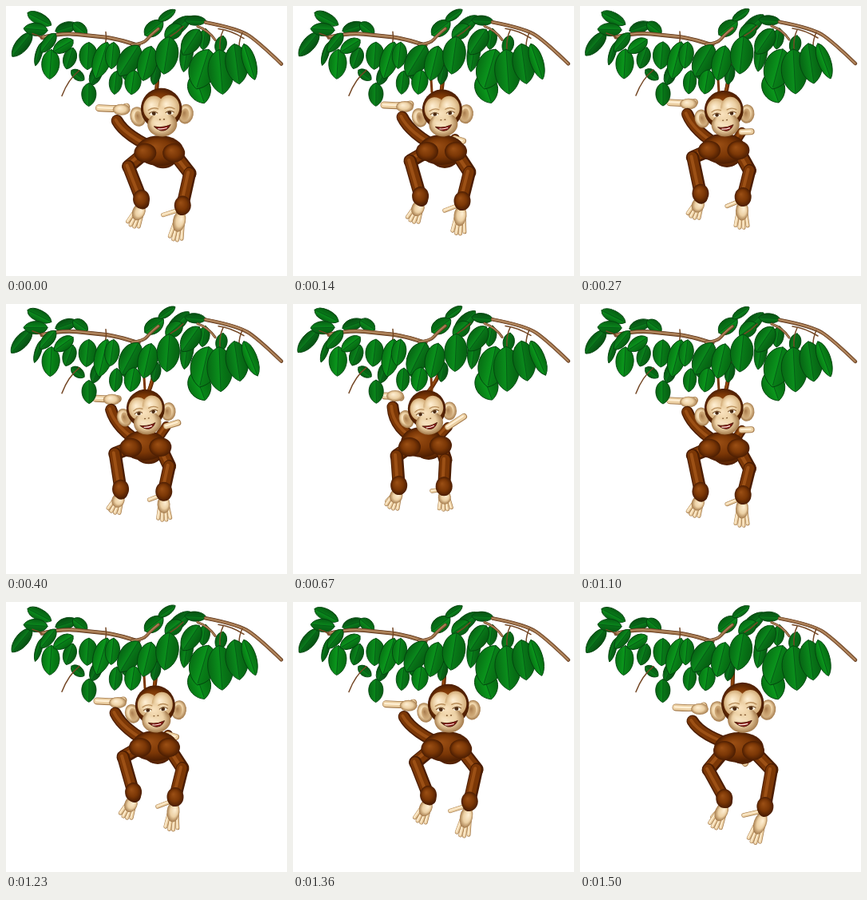
An HTML page with a canvas for the animation above (1670 ms loop, 352x338 px).

```html
<!DOCTYPE html>
<html lang="en">
<head>
<meta charset="utf-8">
<title>Swinging monkey</title>
<style>
html, body { margin: 0; width: 100%; height: 100%; overflow: hidden; background: #fff; }
canvas { display: block; width: 352px; height: 338px; }
</style>
</head>
<body>
<canvas id="stage" width="352" height="338"></canvas>
<script>
const g = document.getElementById('stage').getContext('2d');
g.lineCap = g.lineJoin = 'round';

const LOOP = 1670;
const STARTS = [0, 140, 270, 400, 530, 670, 830, 970, 1100, 1230, 1360, 1500];
const FUR = ['#4b1d02', '#7b3706', '#9c5015'];
const SKIN = ['#a47a4b', '#ecd0a4', '#fff0d5'];
const WOOD = ['#56321a', '#94663f', '#bd946c'];

// Leaves: base x, y, tip x, y, half width
const BACK = [
  [32, 33, 7, 62, 8], [27, 8, 57, 23, 7], [52, 30, 22, 29, 8], [45, 45, 36, 74, 4],
  [62, 31, 89, 22, 7], [84, 21, 102, 34, 7], [84, 52, 75, 78, 8], [82, 80, 98, 92, 6],
  [118, 73, 108, 99, 7], [174, 36, 197, 19, 9], [191, 18, 212, 4, 5], [203, 36, 230, 11, 8],
  [224, 17, 251, 19, 6], [230, 36, 223, 82, 8], [272, 37, 267, 60, 7], [152, 74, 153, 94, 8],
  [190, 74, 185, 98, 6], [220, 24, 200, 40, 9], [250, 28, 246, 54, 7]
];
const FRONT = [
  [62, 34, 43, 57, 7], [57, 54, 55, 91, 11], [84, 42, 60, 58, 8], [104, 45, 101, 79, 11],
  [104, 96, 104, 125, 9], [127, 45, 115, 91, 11], [135, 45, 131, 78, 9], [139, 81, 136, 110, 8],
  [166, 49, 144, 88, 13], [161, 80, 156, 110, 10], [182, 50, 172, 93, 12], [205, 38, 200, 85, 14],
  [242, 29, 221, 60, 11], [236, 84, 249, 121, 14], [254, 54, 241, 104, 17], [267, 54, 270, 110, 16],
  [286, 47, 293, 97, 14], [298, 47, 314, 91, 8]
];

// Joint positions at the right end, at a third of the way, and at the left end
const JOINTS = {
  tailTop: [192, 74, 189, 74, 188, 76], tailEnd: [191, 108, 185, 112, 168, 112],
  chest: [199, 182, 186, 180, 161, 173], hip: [204, 188, 190, 188, 170, 180],
  foot: [150, 134, 140, 126, 128, 115], toe: [120, 132, 114, 124, 115, 115],
  heel: [155, 130, 147, 123, 135, 117],
  ankle: [141, 149, 137, 139, 125, 129], knee: [152, 168, 147, 160, 127, 158],
  ankle2: [200, 193, 203, 166, 194, 154], foot2: [207, 202, 213, 169, 214, 141],
  shoulderL: [181, 186, 168, 182, 146, 179], elbowL: [161, 210, 147, 194, 130, 190],
  wristL: [183, 250, 161, 243, 133, 231], tipL: [168, 283, 149, 270, 123, 256],
  thumbL: [166, 269, 147, 265, 118, 247],
  shoulderR: [217, 186, 204, 182, 185, 177], elbowR: [240, 210, 221, 208, 191, 195],
  wristR: [231, 261, 211, 248, 189, 232], tipR: [217, 302, 207, 286, 191, 258],
  thumbR: [205, 267, 190, 256, 174, 234],
  head: [204, 136, 187.5, 137.5, 169, 139]
};

// Parabola through the values at d = 0, 2 and 6
const bend = (a, b, c, d) =>
  a * (d - 2) * (d - 6) / 12 - b * d * (d - 6) / 8 + c * d * (d - 2) / 24;

function pose(d) {
  const p = {};
  for (const name in JOINTS) {
    const [x0, y0, x1, y1, x2, y2] = JOINTS[name];
    p[name] = [bend(x0, x1, x2, d), bend(y0, y1, y2, d)];
  }
  return p;
}

const mix = (a, b, t) => [a[0] + (b[0] - a[0]) * t, a[1] + (b[1] - a[1]) * t];

function line(pts, width, color) {
  g.beginPath();
  g.moveTo(...pts[0]);
  for (let i = 1; i < pts.length - 1; i++) {
    const end = i === pts.length - 2 ? pts[i + 1] : mix(pts[i], pts[i + 1], .5);
    g.quadraticCurveTo(...pts[i], ...end);
  }
  if (pts.length === 2) g.lineTo(...pts[1]);
  g.lineWidth = width;
  g.strokeStyle = color;
  g.stroke();
}

// Rounded tube, lit from the upper left
function tube(pts, width, [dark, mid, light]) {
  line(pts, width, dark);
  const up = k => pts.map(([x, y]) => [x - width * k, y - width * k * .6]);
  line(up(.04), width * .78, mid);
  line(up(.12), width * .25, light);
}

function ball(x, y, rx, ry, [dark, mid, light], turn = 0) {
  g.save();
  g.translate(x, y);
  g.rotate(turn);
  g.scale(rx, ry);
  const fill = g.createRadialGradient(-.25, -.3, 0, 0, 0, 1);
  fill.addColorStop(0, light);
  fill.addColorStop(.6, mid);
  fill.addColorStop(1, dark);
  g.fillStyle = fill;
  g.beginPath();
  g.arc(0, 0, 1, 0, 7);
  g.fill();
  g.restore();
}

function dot(x, y, rx, ry, color) {
  g.beginPath();
  g.ellipse(x, y, rx, ry, 0, 0, 7);
  g.fillStyle = color;
  g.fill();
}

function leaf([x, y, tx, ty, w], i, sway, front) {
  const len = Math.hypot(tx - x, ty - y);
  const tone = (front ? 0 : -14) + i * 7 % 4 * 5;
  const green = v => `rgb(${v * .07}, ${v + tone}, ${v * .2})`;
  g.save();
  g.translate(x, y + sway * .7);
  g.rotate(Math.atan2(ty - y, tx - x) + sway * .045 * (i % 3 - .7));
  const fill = g.createLinearGradient(0, w, 0, -w);
  fill.addColorStop(0, green(100));
  fill.addColorStop(.47, green(138));
  fill.addColorStop(.53, green(118));
  fill.addColorStop(1, green(92));
  g.beginPath();
  g.moveTo(0, 0);
  g.bezierCurveTo(len * .12, w * 1.35, len * .8, w * 1.35, len, 0);
  g.bezierCurveTo(len * .8, -w * 1.35, len * .12, -w * 1.35, 0, 0);
  g.fillStyle = fill;
  g.fill();
  g.lineWidth = .9;
  g.strokeStyle = '#04450f';
  g.stroke();
  line([[0, 0], [len * .95, 0]], .9, '#075b17');
  g.restore();
}

function tree(sway) {
  BACK.forEach((l, i) => leaf(l, i, sway, false));
  g.save();
  g.translate(0, sway * .6);
  tube([[45, 39], [70, 33], [108, 37], [138, 40], [166, 49]], 5, WOOD);
  tube([[158, 48], [172, 47], [181, 36], [191, 28]], 4, WOOD);
  tube([[250, 20], [292, 28], [318, 46], [345, 72]], 4.5, WOOD);
  tube([[240, 25], [254, 30], [262, 42]], 3, WOOD);
  const twigs = [
    [[92, 80], [78, 91], [70, 112]], [[125, 32], [127, 45], [121, 54]],
    [[266, 28], [282, 30], [298, 40]], [[272, 30], [267, 40], [268, 54]],
    [[278, 55], [286, 62], [290, 72]], [[205, 38], [214, 33], [222, 25]],
    [[45, 39], [39, 36], [33, 34]], [[296, 33], [292, 42], [292, 50]]
  ];
  twigs.forEach(t => line(t, 1.5, '#744725'));
  g.restore();
  FRONT.forEach((l, i) => leaf(l, i, sway, true));
}

function hand(wrist, tip, thumb) {
  const dx = tip[0] - wrist[0], dy = tip[1] - wrist[1];
  const len = Math.hypot(dx, dy), nx = -dy / len, ny = dx / len;
  const palm = mix(wrist, tip, .38);
  tube([wrist, mix(wrist, thumb, .65), thumb], 5.5, SKIN);
  for (const k of [-1.5, -.5, .5, 1.5]) {
    const reach = 1 - Math.abs(k) * .07;
    tube([
      [palm[0] + nx * k * 3, palm[1] + ny * k * 3],
      [wrist[0] + dx * reach + nx * k * 5, wrist[1] + dy * reach + ny * k * 5]
    ], 5, SKIN);
  }
  ball(...palm, len * .34, 8, SKIN, Math.atan2(dy, dx));
}

function arm(p, side) {
  const [shoulder, elbow, wrist] = ['shoulder', 'elbow', 'wrist'].map(n => p[n + side]);
  hand(wrist, p['tip' + side], p['thumb' + side]);
  tube([shoulder, elbow], 17, FUR);
  tube([elbow, mix(elbow, wrist, .5), wrist], 16, FUR);
  ball(...mix(elbow, wrist, .9), 10.5, 12, FUR);
}

function head([x, y], d) {
  const size = bend(1.07, 1, .95, d);
  g.save();
  g.translate(x, y);
  g.rotate(bend(-.03, -.08, -.19, d));
  g.scale(size, size);
  for (const s of [-1, 1]) {
    ball(s * 29, 0, 9.5, 12, SKIN, s * .2);
    ball(s * 28, 1, 5, 8, ['#d2ae7d', '#c79f6d', '#a87b4d'], s * .2);
  }
  ball(0, -8, 25, 25, FUR);
  for (const s of [-1, 1]) ball(s * 9, -9, 13, 15, ['#d1ab78', ...SKIN.slice(1)]);
  ball(0, 11, 18, 15, SKIN);
  ball(0, 0, 13, 12, ['#eed3a800', '#eed3a8', '#fae3bf']);
  for (const s of [-1, 1]) {
    line([[s * 4, -8], [s * 10, -11], [s * 16, -7]], 1.3, '#b88d59');
    dot(s * 10, -3, 4.6, 2.7, '#fff8e8');
    dot(s * 9.5, -2.8, 2.4, 2.4, '#4b2a13');
    line([[s * 5, -3], [s * 10, -7], [s * 15, -3]], 1.2, '#80582f');
    dot(s * 2.5, 5, 1.1, .8, '#80582f');
  }
  g.beginPath();
  g.moveTo(-10, 13);
  g.quadraticCurveTo(0, 16, 10, 12);
  g.quadraticCurveTo(2, 25, -10, 13);
  g.fillStyle = '#8b1515';
  g.fill();
  g.lineWidth = 1;
  g.strokeStyle = '#54200f';
  g.stroke();
  line([[-5, 16], [0, 17], [5, 15.5]], 1.2, '#fff1e6');
  g.restore();
}

function monkey(d) {
  const p = pose(d);
  const mid = mix(p.tailTop, p.tailEnd, .55);
  tube([p.tailTop, [mid[0] + d * .7, mid[1]], p.tailEnd], 5, FUR);
  if (d > 1) line([[173, 92], [174, 108]], 3, FUR[1]);

  tube([p.hip, p.ankle2], 12, FUR);
  tube([p.ankle2, p.foot2], 8, SKIN);

  tube([p.toe, p.foot, p.heel], 9, SKIN);
  ball(...p.foot, 11, 7, SKIN);
  tube([p.ankle, p.knee, p.chest], 15, FUR);

  ball(...p.hip, 18, 15, FUR);
  arm(p, 'L');
  arm(p, 'R');
  ball(...p.chest, bend(31, 29, 26, d), 19, FUR);
  ball(...p.shoulderL, 14, 12, FUR);
  ball(...p.shoulderR, 14, 12, FUR);
  head(p.head, d);
}

function draw(now) {
  const t = now % LOOP;
  const step = STARTS.filter(s => s <= t).length - 1;
  const d = step < 6 ? step + 1 : 11 - step;
  g.clearRect(0, 0, 352, 338);
  monkey(d);
  tree(Math.cos(Math.PI * d / 6));
  requestAnimationFrame(draw);
}
requestAnimationFrame(draw);
</script>
</body>
</html>
```
